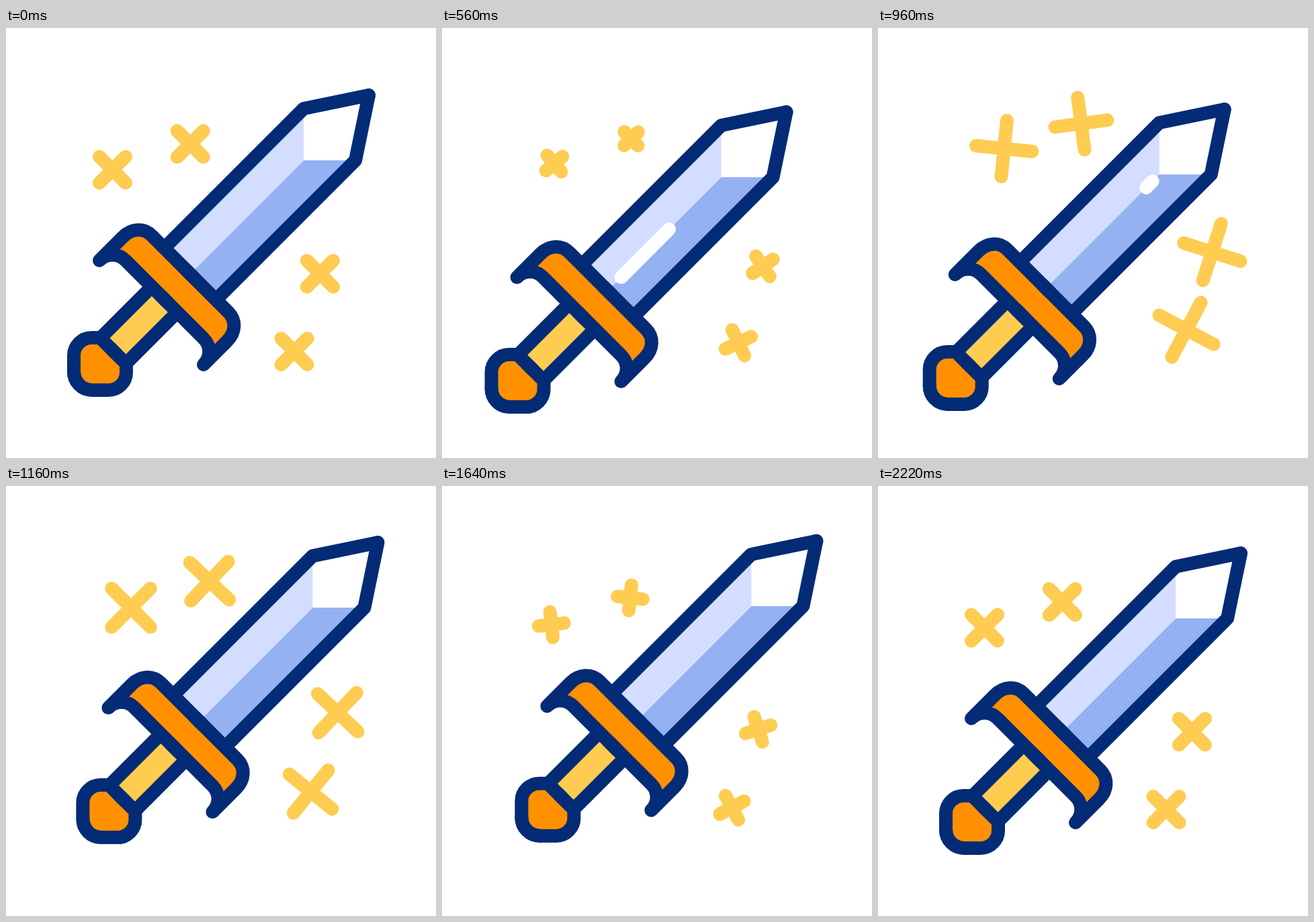
An HTML page with a canvas for the animation above (2820 ms loop, 640 by 640 pixels).

```html
<!DOCTYPE html>
<html lang="en">
<head>
<meta charset="utf-8">
<title>Sword</title>
<style>
  html, body { margin: 0; width: 100%; height: 100%; overflow: hidden; background: #fff; }
  canvas { display: block; width: 100vw; height: 100vh; }
</style>
</head>
<body>
<canvas id="stage" width="640" height="640"></canvas>
<script>
const ctx = document.getElementById('stage').getContext('2d');
const SIZE = 640, LOOP = 2820, ACTIVE = 2220, STEP = 20;
const NAVY = '#042b75', ORANGE = '#ff9100', YELLOW = '#ffcc52';
const LIGHT = '#d3ddff', BLUE = '#94b1f2', WHITE = '#fff';

// Every shape is one half; the other half is its reflection in the sword's axis.
const FACET = new Path2D('M443 120 V197.5 L275 365.5 L236 327 Z');
const EDGE = new Path2D('M236 327 L443 120 L540 100');
const GRIP = new Path2D('M217 385 L140 462 L163 485 L240 408 Z');
const GRIP_EDGE = new Path2D('M217 385 L140 462');
const GUARD = new Path2D('M280 372 L217 309 C205 297 187 298 174 311 L139 346 ' +
  'C150 335 167 335 178 346 L242 410');
const POMMEL = new Path2D('M163 484 L140 461 H127 C113 461 101 473 101 487 V511 ' +
  'C101 527 113 539 129 539');

const mix = (a, b, k) => a + (b - a) * k;

function ease(t, from, to) {
  const u = Math.min(1, Math.max(0, (t - from) / (to - from)));
  return u * u * (3 - 2 * u);
}

// Moves through the values, easing from each beat to the next
function sequence(t, beats, values) {
  const next = beats.findIndex(beat => t < beat);
  if (next === 0) return values[0];
  if (next < 0) return values.at(-1);
  return mix(values[next - 1], values[next], ease(t, beats[next - 1], beats[next]));
}

function mirrored(draw) {
  ctx.save();
  ctx.transform(0, -1, -1, 0, SIZE, SIZE);
  draw();
  ctx.restore();
}

function bothSides(draw) {
  mirrored(draw);
  draw();
}

function fill(shape, color) {
  ctx.fillStyle = color;
  ctx.fill(shape);
}

function stroke(shape, color) {
  ctx.strokeStyle = color;
  ctx.lineWidth = 20;
  ctx.stroke(shape);
}

function line(x1, y1, x2, y2, color) {
  const path = new Path2D();
  path.moveTo(x1, y1);
  path.lineTo(x2, y2);
  stroke(path, color);
}

// Later stars follow the same motion with a delay and a slightly smaller reach.
function drawStar(x, y, order, time) {
  const t = time - order * 37, less = order * 1.5, rest = 27.6;
  const beats = [0, 370, 950, 1700, 2110];
  const shift = sequence(t, beats, [0, 6, 30, 2, 0]);
  const arm = sequence(t, beats, [rest, 13, 46 - less, 20 - less, rest]);
  const turn = sequence(t, [0, 425, 1085, 1770, 2110], [0, -90, 90, -90, 0]);
  ctx.save();
  ctx.translate(x + shift, y - shift * 1.08);
  ctx.rotate((turn + 45) * Math.PI / 180);
  line(-arm, 0, arm, 0, YELLOW);
  line(0, -arm, 0, arm, YELLOW);
  ctx.restore();
}

function drawStarPair(x, y, order, t) {
  drawStar(SIZE - y, SIZE - x, order, t);
  drawStar(x, y, order + 2, t);
}

function drawShine(t) {
  const head = ease(t, 350, 760), tail = ease(t, 535, 1040);
  if (head <= 0 || tail >= 1) return;
  const from = mix(293, 433, tail), to = mix(293, 433, head);
  line(from, SIZE - from, to, SIZE - to, WHITE);
}

function drawSword(t) {
  const beats = [250, 770, 1380, 1880];
  ctx.save();
  ctx.translate(sequence(t, beats, [0, -42.7, 37, 0]), sequence(t, beats, [0, 39, -39, 0]));

  mirrored(() => fill(FACET, BLUE));
  fill(FACET, LIGHT);
  drawShine(t);
  bothSides(() => stroke(EDGE, NAVY));

  bothSides(() => fill(GRIP, YELLOW));
  bothSides(() => stroke(GRIP_EDGE, NAVY));

  for (const part of [GUARD, POMMEL]) {
    bothSides(() => fill(part, ORANGE));
    bothSides(() => stroke(part, NAVY));
  }
  ctx.restore();
}

function render(now) {
  const t = Math.min(ACTIVE, Math.floor((now % LOOP) / STEP) * STEP);
  ctx.fillStyle = WHITE;
  ctx.fillRect(0, 0, SIZE, SIZE);
  ctx.lineCap = ctx.lineJoin = 'round';
  drawStarPair(158.5, 211, 0, t);
  drawStarPair(274.3, 172.6, 1, t);
  drawSword(t);
}

let start;
function tick(now) {
  start ??= now;
  render(now - start);
  requestAnimationFrame(tick);
}
render(0);
requestAnimationFrame(tick);
</script>
</body>
</html>
```
